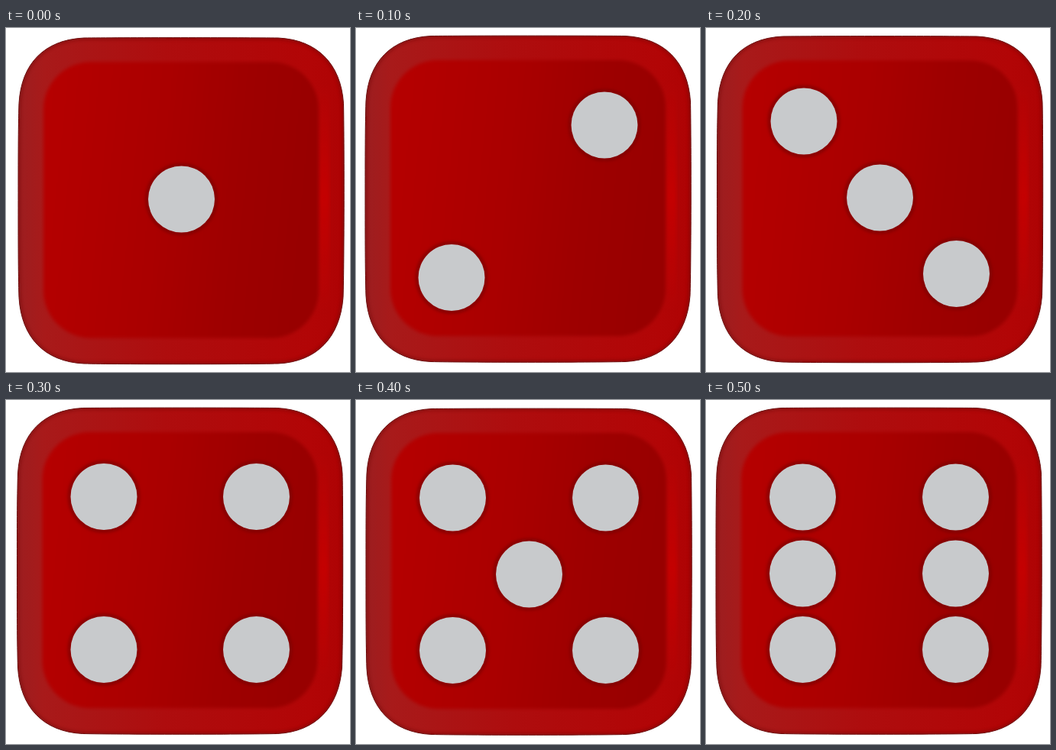
An HTML page for the animation above (600 ms loop, 450 px wide and 450 px high).

```html
<!DOCTYPE html>
<html lang="en">
<head>
<meta charset="utf-8">
<title>Rolling die</title>
<style>
html, body { margin: 0; width: 100%; height: 100%; overflow: hidden; background: #fff; }
svg { display: block; width: 450px; height: 450px; }
</style>
</head>
<body>
<svg viewBox="0 0 450 450">
  <defs>
    <linearGradient id="bevel">
      <stop offset="0" stop-color="#9c1e20"/>
      <stop offset=".08" stop-color="#a81a1a"/>
      <stop offset=".45" stop-color="#ae0d0e"/>
      <stop offset=".9" stop-color="#b20506"/>
      <stop offset="1" stop-color="#ae0304"/>
    </linearGradient>
    <linearGradient id="face" x2="1" y2=".1">
      <stop offset="0" stop-color="#b60000"/>
      <stop offset=".45" stop-color="#aa0000"/>
      <stop offset=".75" stop-color="#9e0000"/>
      <stop offset="1" stop-color="#980000"/>
    </linearGradient>
    <linearGradient id="shine" x2="0" y2="1">
      <stop offset="0" stop-color="#c60000" stop-opacity="0"/>
      <stop offset=".5" stop-color="#c60000" stop-opacity=".9"/>
      <stop offset="1" stop-color="#c60000" stop-opacity="0"/>
    </linearGradient>
    <filter id="soft" x="-10%" y="-10%" width="120%" height="120%"><feGaussianBlur stdDeviation="2"/></filter>
    <filter id="rim" x="-5%" y="-5%" width="110%" height="110%"><feGaussianBlur stdDeviation=".7"/></filter>
    <path id="outline" d="M0 213C0 160 0 120 1 86C4 34 34 3 86 .5C130 0 295 0 340 .5C391 3 422 34 425.5 86C426.5 130 426.5 296 425 340C421 392 391 424 340 426.5C295 427.5 130 427.5 86 426.5C34 424 4 392 1 340C0 306 0 266 0 213Z"/>
    <clipPath id="edge"><use href="#outline"/></clipPath>
  </defs>
  <g id="die">
    <use href="#outline" fill="url(#bevel)" stroke="#6c1010"/>
    <g clip-path="url(#edge)">
      <use href="#outline" fill="none" stroke="#700c0c" stroke-width="4" opacity=".6" filter="url(#soft)"/>
      <rect x="393" y="60" width="14" height="300" rx="7" fill="url(#shine)" filter="url(#soft)"/>
      <rect x="33" y="32" width="360" height="361" rx="62" fill="url(#face)" filter="url(#soft)"/>
    </g>
  </g>
  <g id="pips"></g>
</svg>
<script>
const STEP = 100, R = 43.5;
// die: top left corner; pips: centres
const rolls = [
  { die: [16, 12.5], pips: [[229.5, 224]] },
  { die: [12, 10], pips: [[325, 127], [125, 326.5]] },
  { die: [14.5, 10.5], pips: [[128, 122], [227.5, 222], [327.5, 321.5]] },
  { die: [14.5, 10], pips: grid(128, 327.5, [126.5, 326.5]) },
  { die: [13, 11], pips: [...grid(126.5, 326.5, [128, 327.5]), [226.5, 228]] },
  { die: [13, 10], pips: grid(126.5, 326.5, [127, 227, 326.5]) }
];

function grid(left, right, rows) {
  return rows.flatMap(y => [[left, y], [right, y]]);
}

const die = document.getElementById("die");
const layer = document.getElementById("pips");

function pip([x, y]) {
  const at = `cx="${x}" cy="${y}"`;
  return `<circle ${at} r="${R + 1}" fill="none" stroke="#7c0404" stroke-width="4" filter="url(#soft)"/>` +
    `<circle ${at} r="${R}" fill="#c8cacc" filter="url(#rim)"/>`;
}

let shown = -1;
function show(time) {
  const i = Math.floor(time / STEP) % rolls.length;
  if (i === shown) return;
  shown = i;
  const { die: [x, y], pips } = rolls[i];
  die.setAttribute("transform", `translate(${x} ${y})`);
  layer.innerHTML = pips.map(pip).join("");
}

const start = performance.now();
function tick() {
  show(performance.now() - start);
  requestAnimationFrame(tick);
}
tick();
</script>
</body>
</html>
```
